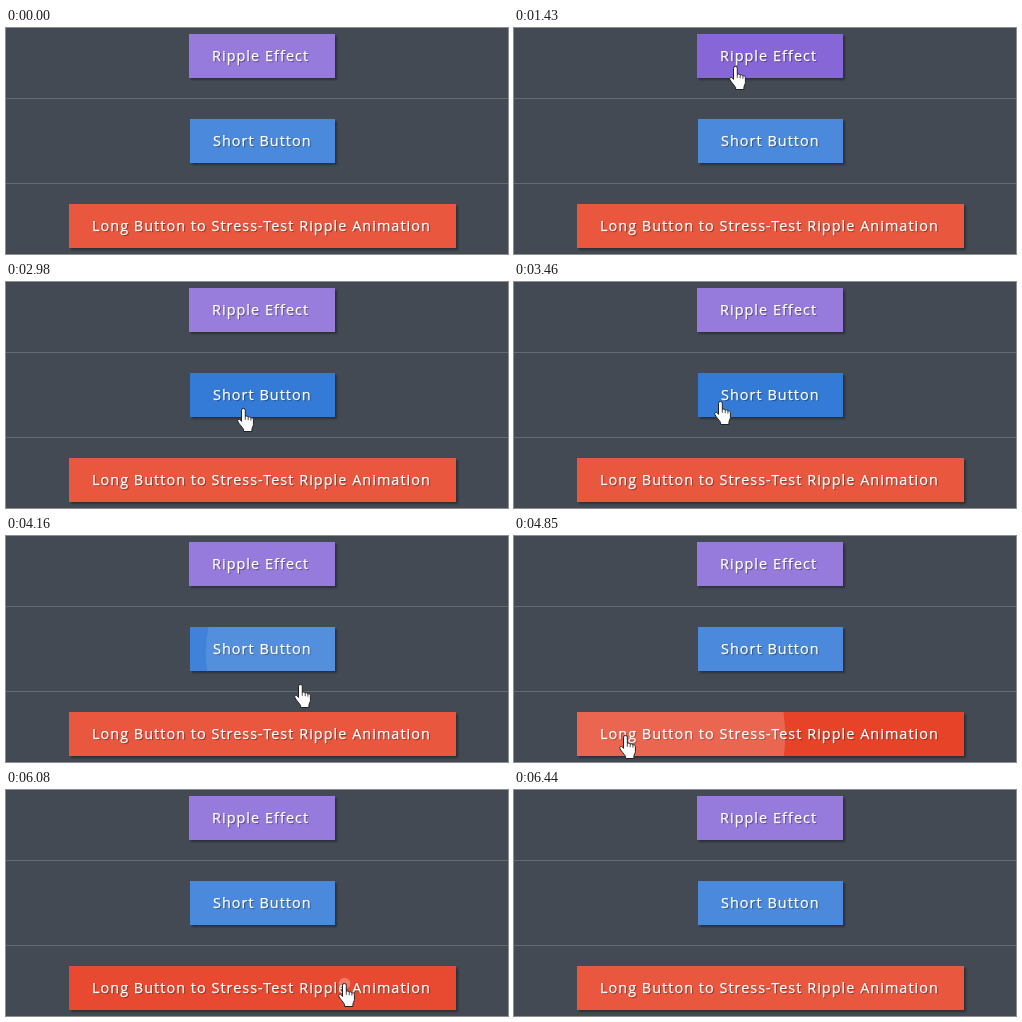
Recreate the animation shown at these times as an HTML page. Size 502 by 226 pixels, loop 7.37 s.

```html
<!DOCTYPE html>
<html lang="en">
<head>
<meta charset="utf-8">
<title>Ripple buttons</title>
<style>
  html, body { margin: 0; width: 100%; height: 100%; overflow: hidden; background: #434a54; }
  #stage { position: absolute; left: 0; top: 0; width: 502px; height: 226px; overflow: hidden; }
  hr { position: absolute; left: 0; width: 100%; height: 1px; margin: 0; border: 0; background: #656b73; }
  .button {
    position: absolute; box-sizing: border-box; height: 44px; padding-left: 23px; overflow: hidden;
    font: 14.4px/44px "Open Sans", sans-serif; letter-spacing: 1.05px;
    color: #fff; white-space: nowrap;
    -webkit-text-stroke: .25px #fff;
    text-shadow: 1px 1px 1px rgba(0, 0, 0, .45);
    box-shadow: 2px 2px 2px rgba(0, 0, 0, .35);
  }
  .ink { position: absolute; border-radius: 50%; background: #fff; }
  #press {
    position: absolute; width: 24px; height: 24px; margin: -12px; border-radius: 50%;
    background: rgba(255, 240, 0, .5);
  }
  #cursor { position: absolute; left: -6px; top: 0; overflow: visible; }
</style>
</head>
<body>
<div id="stage">
  <hr style="top:70px">
  <hr style="top:155px">
</div>
<script>
const LOOP = 7370, FIRST = 390, LAST = 6290, END = 6440;
const STEP = (END - FIRST) / 87;
const HOVER_FADE = 200, RIPPLE = 650, PRESS = 100;

const buttons = [
  { text: 'Ripple Effect', x: 183, y: 6, w: 146, color: '#967adc', dark: '#8766d7', hover: [1010, 2590] },
  { text: 'Short Button', x: 184, y: 91, w: 145, color: '#4a89dc', dark: '#347bd8', hover: [2755, 4040] },
  { text: 'Long Button to Stress-Test Ripple Animation', x: 63, y: 176, w: 387,
    color: '#e9573f', dark: '#e64328', hover: [4390, END] },
];

// rest: faint tint that stays after the ripple has run out
const clicks = [
  { button: 0, time: 1550, x: 221, y: 38, rest: .03 },
  { button: 0, time: 2365, x: 307, y: 33, rest: 0 },
  { button: 1, time: 3730, x: 315, y: 116, rest: 0 },
  { button: 2, time: 4626, x: 111, y: 199, rest: .04 },
  { button: 2, time: 6015, x: 338, y: 193, rest: 0 },
];

// time, x and y of the fingertip
const path = [
  [250, 484, 240], [1080, 218, 41], [1300, 221, 38], [1700, 221, 38],
  [2230, 308, 33], [2440, 308, 33], [2980, 237, 126], [3200, 206, 119],
  [3500, 206, 119], [3680, 315, 116], [3800, 316, 117], [3960, 328, 130],
  [4220, 286, 152], [4560, 111, 199], [4980, 111, 199], [5450, 338, 193],
];

const stage = document.getElementById('stage');
const clamp = v => Math.min(1, Math.max(0, v));
const smooth = v => v * v * (3 - 2 * v);

function add(parent, props, style = {}) {
  const el = Object.assign(document.createElement('div'), props);
  Object.assign(el.style, style);
  return parent.appendChild(el);
}

for (const b of buttons) {
  b.el = add(stage, { className: 'button', textContent: b.text },
    { left: b.x + 'px', top: b.y + 'px', width: b.w + 'px' });
}
for (const c of clicks) {
  const b = buttons[c.button];
  c.ink = add(b.el, { className: 'ink' }, {
    width: b.w + 'px', height: b.w + 'px',
    left: c.x - b.x - b.w / 2 + 'px', top: c.y - b.y - b.w / 2 + 'px',
  });
}
const press = add(stage, { id: 'press' });
const hand = add(stage, { innerHTML: `
  <svg id="cursor" width="17" height="24" fill="#fff" stroke="#222" stroke-linejoin="round">
    <path d="M4.5 13.4V2.3a1.9 1.9 0 0 1 3.8 0V8.4c.6-.7 2.7-.5 2.9.8.6-.7 2.5-.4 2.7.9.8-.6 2.5-.2 2.5 1.4v5c0 2-1.5 3-1.5 5v2H6.6v-2C5.4 19.3 1.5 15.4.8 13.3.3 11.6 2.2 10.6 3.4 12z"/>
    <path d="M8.3 8.4v3.4M11.2 9.2v3M13.9 10.1v2.6" fill="none" stroke-width=".8"/>
  </svg>` }, { position: 'absolute', left: 0, top: 0 });

function fingertip(t) {
  const next = path.findIndex(key => key[0] > t);
  if (next < 0) return path[path.length - 1].slice(1);
  if (next === 0) return path[0].slice(1);
  const [t0, x0, y0] = path[next - 1], [t1, x1, y1] = path[next];
  const k = smooth((t - t0) / (t1 - t0));
  return [x0 + (x1 - x0) * k, y0 + (y1 - y0) * k];
}

function render(t) {
  const levels = buttons.map(({ hover: [enter, leave] }) =>
    clamp((t - enter) / HOVER_FADE) - clamp((t - leave) / HOVER_FADE));
  buttons.forEach((b, i) => {
    b.el.style.backgroundColor = `color-mix(in srgb, ${b.dark} ${levels[i] * 100}%, ${b.color})`;
  });
  for (const c of clicks) {
    const p = clamp((t - c.time) / RIPPLE);
    c.ink.style.transform = `scale(${2.5 * p})`;
    c.ink.style.opacity = Math.max(c.rest * levels[c.button], .28 * (1 - p));
  }
  const pressed = clicks.find(c => t >= c.time - PRESS && t < c.time);
  press.style.display = pressed ? 'block' : 'none';
  if (pressed) {
    press.style.left = pressed.x + 'px';
    press.style.top = pressed.y + 'px';
  }
  const [x, y] = fingertip(t).map(Math.round);
  hand.style.transform = `translate(${x}px, ${y}px)`;
}

// The picture advances in even steps, holds briefly, then snaps back to rest.
function sceneTime(t) {
  if (t < FIRST || t >= END) return 0;
  return Math.min(LAST, FIRST + Math.floor((t - FIRST) / STEP) * STEP);
}

const start = performance.now();
function tick() {
  render(sceneTime((performance.now() - start) % LOOP));
  requestAnimationFrame(tick);
}
tick();
</script>
</body>
</html>
```
